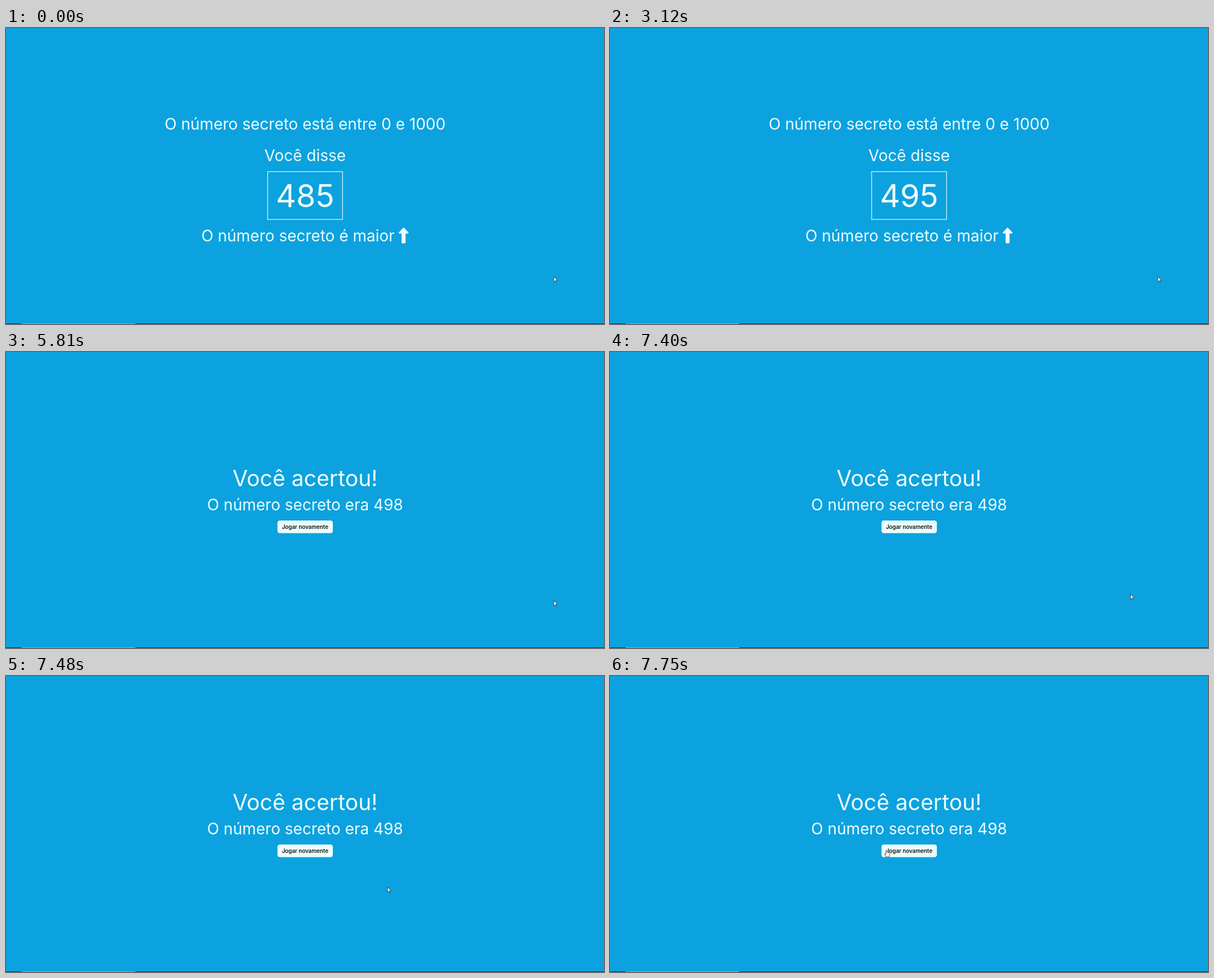
An HTML page with a canvas for the animation above (8 s loop, 1063x527 px).

```html
<!DOCTYPE html>
<html lang="pt-BR">
<head>
<meta charset="utf-8">
<title>Número secreto</title>
<style>
  html, body { margin: 0; width: 100%; height: 100%; overflow: hidden; background: #0ca2df; }
  canvas { display: block; }
</style>
</head>
<body>
<canvas id="stage" width="1063" height="527"></canvas>
<script>
const ctx = document.getElementById('stage').getContext('2d');
const LOOP = 8000;
const CENTER = 531.7;
const BLUE = '#0ca2df', PALE = '#edfdfd', INK = '#0d1519';

const guesses = [[0, '485'], [520, '490'], [3120, '495']];
const WIN_AT = 5810;
const HAND_AT = 7680;

// Pointer tip: time, x, y; each position holds until the next one.
const pointer = [
  [0, 973.5, 442.6], [7270, 971.8, 442], [7340, 925, 431], [7410, 812, 405],
  [7480, 678, 375.6], [7540, 592, 348], [7610, 535, 327], [7680, 503, 314],
  [7750, 491.4, 309.8]
];

const arrowUp = new Path2D('M318 177.5c3.8-8.8 2-19-4.6-26l-136-144C172.9 2.7 166.6 0 160 0s-12.9 2.7-17.4 7.5l-136 144c-6.6 7-8.4 17.2-4.6 26S14.4 192 24 192H96V480c0 17.7 14.3 32 32 32h64c17.7 0 32-14.3 32-32V192h72c9.6 0 18.2-5.7 22-14.5z');
const arrowCursor = new Path2D('M.5 .5V16.6L4.3 13L6.8 18.6L9 17.6L6.5 12.2H11.7Z');
const handCursor = new Path2D('M0 .5Q1.5 .5 1.5 2V7Q4.5 6.5 4.7 8Q7.5 7.5 7.8 9Q10.5 8.7 10.5 11V15L8.5 19V22H-1.5V19.5L-6 13Q-6.3 11 -4.5 11L-1.5 13.5V2Q-1.5 .5 0 .5Z');

const latest = (list, t) => list.findLast(item => item[0] <= t);

function setFont(size, weight = 400) {
  ctx.font = `${weight} ${size}px Inter, sans-serif`;
}

function text(str, y, size, { x = CENTER, align = 'center', color = PALE, weight } = {}) {
  setFont(size, weight);
  ctx.textAlign = align;
  ctx.fillStyle = color;
  ctx.fillText(str, x, y);
}

function shape(path, x, y, scale, fill, stroke) {
  ctx.save();
  ctx.translate(x, y);
  ctx.scale(scale, scale);
  ctx.fillStyle = fill;
  ctx.fill(path);
  if (stroke) {
    ctx.strokeStyle = stroke;
    ctx.lineWidth = 1.2;
    ctx.stroke(path);
  }
  ctx.restore();
}

function drawGuess(number) {
  text('O número secreto está entre 0 e 1000', 181.4, 28);
  text('Você disse', 237.4, 28);
  text(number, 318.6, 56);
  const width = ctx.measureText(number).width + 29.1;
  ctx.strokeStyle = PALE;
  ctx.lineWidth = 1.15;
  ctx.strokeRect(CENTER - width / 2, 255.7, width, 85.1);
  text('O número secreto é maior', 380.2, 28, { x: 347.2, align: 'left' });
  shape(arrowUp, 698, 355.5, 28 / 512, PALE);
}

function drawWin() {
  text('Você acertou!', 238.7, 39.2);
  text('O número secreto era 498', 282.3, 28);
  ctx.fillStyle = PALE;
  ctx.beginPath();
  ctx.roundRect(482.6, 300, 98.4, 22.4, 4.2);
  ctx.fill();
  text('Jogar novamente', 314.6, 9.8, { color: INK, weight: 600 });
}

function drawPointer(t) {
  const [, x, y] = latest(pointer, t);
  shape(t < HAND_AT ? arrowCursor : handCursor, x, y, 0.56, '#fff', INK);
}

function drawEdge() {
  ctx.fillStyle = '#0b3346';
  ctx.fillRect(0, 526, 1063, 1);
  ctx.fillStyle = '#62b5d8';
  ctx.fillRect(28, 526, 202, 1);
}

function frame() {
  const t = performance.now() % LOOP;
  ctx.fillStyle = BLUE;
  ctx.fillRect(0, 0, 1063, 527);
  if (t < WIN_AT) drawGuess(latest(guesses, t)[1]);
  else drawWin();
  drawEdge();
  drawPointer(t);
  requestAnimationFrame(frame);
}
frame();
</script>
</body>
</html>
```
